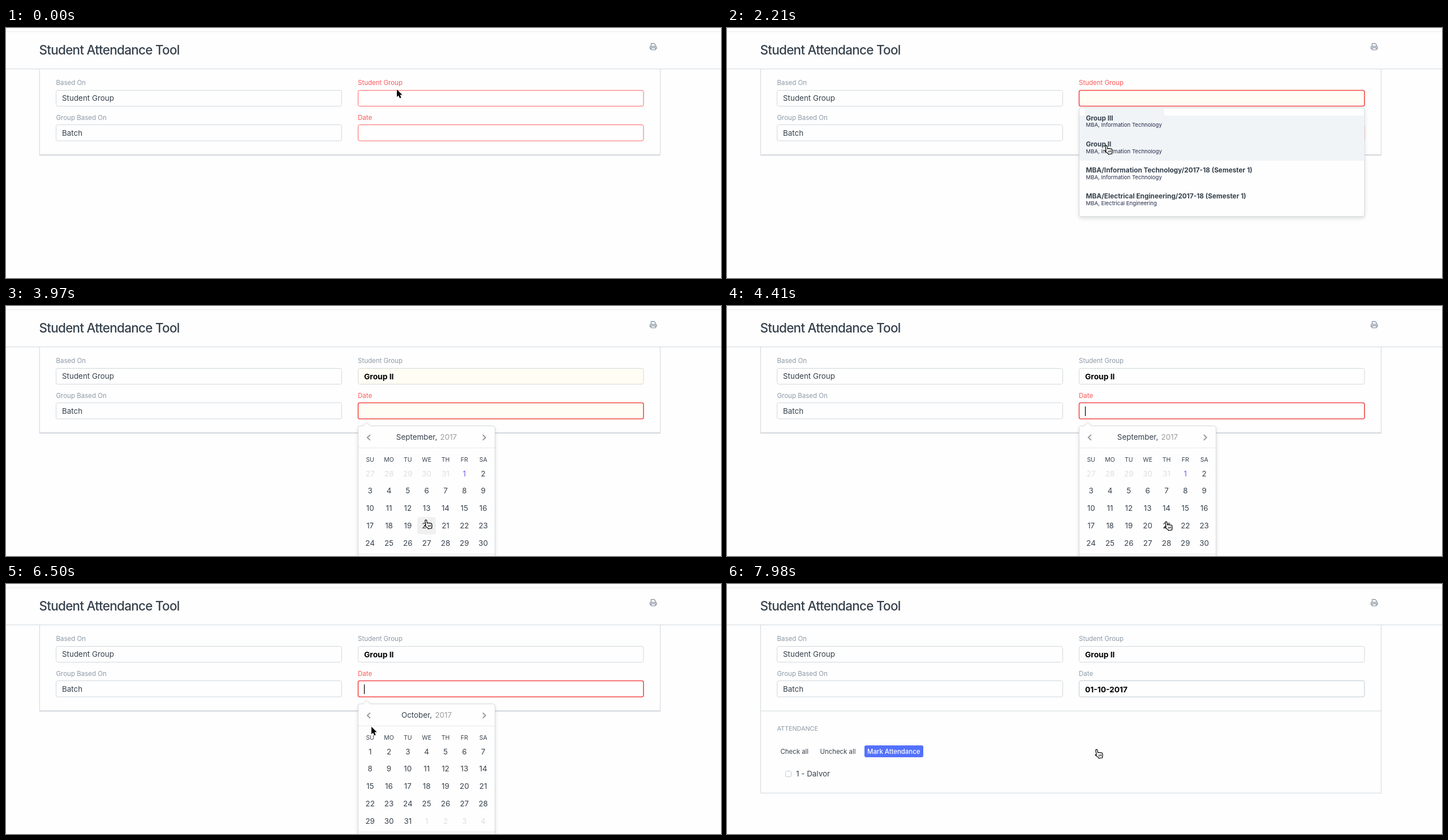
Write an HTML page that moves like this. It is 1264 px wide and 443 px high and loops after 8000 ms.

```html
<!DOCTYPE html>
<html lang="en">
<head>
<meta charset="utf-8">
<title>Student Attendance Tool</title>
<style>
  html, body { margin: 0; width: 100%; height: 100%; overflow: hidden; background: #fefefe; }
  svg { display: block; width: 100%; height: 100%; }
  text { font: 13.4px Inter, "Open Sans", sans-serif; font-optical-sizing: none; fill: #36414c; white-space: pre; }
  .title { font-size: 22.5px; font-weight: 500; letter-spacing: -.75px; }
  .label { font-size: 11.5px; fill: #8d99a6; }
  .bold { font-size: 13.8px; font-weight: 700; fill: #000; }
  .item { font-size: 11.8px; font-weight: 700; }
  .sub { font-size: 9.6px; fill: #222a4a; }
  .mid { text-anchor: middle; }
  .week { font-size: 10.5px; }
  .small { font-size: 11.4px; }
  .box { fill: #fefefe; stroke: #d1d8dd; }
  .line { fill: none; stroke: #d1d8dd; }
  .pop { fill: #fefefe; stroke: #d3d9dd; filter: drop-shadow(0 3px 3px rgba(0,0,0,.13)); }
  .chevron { fill: none; stroke: #9c9c9c; stroke-width: 2; }
  .caret { stroke: #000; stroke-width: 1.2; }
</style>
</head>
<body>
<svg viewBox="0 0 1264 443">
  <path d="M0 6.5H1264" stroke="#e8ebed"/>
  <path class="line" d="M59.5 72V225M1156.5 72V225"/>
  <path id="edge" d="M59 225H1157" stroke="#d1d8dd"/>
  <path class="line" d="M0 72.5H1264"/>
  <text class="title" x="58.5" y="47">Student Attendance Tool</text>
  <g fill="none" stroke="#8d99a6" stroke-width="1.3">
    <path d="M1140.5 33V27.5H1146L1148 29.5V33M1140.5 36.5H1138.5V33.5Q1138.5 32.5 1139.5 32.5H1149Q1150 32.5 1150 33.5V36.5H1148M1140.5 35H1148V38.7H1140.5Z"/>
  </g>

  <text class="label" x="88.5" y="101">Based On</text>
  <text class="label" x="88.5" y="163">Group Based On</text>
  <text class="label" id="groupLabel" x="622" y="101">Student Group</text>
  <text class="label" id="dateLabel" x="622" y="163">Date</text>
  <rect class="box" x="88.5" y="110.5" width="505" height="28" rx="3"/>
  <rect class="box" x="88.5" y="171.5" width="505" height="28.5" rx="3"/>
  <rect class="box" id="groupBox" x="622.5" y="110.5" width="504.5" height="28" rx="3"/>
  <rect class="box" id="dateBox" x="622.5" y="171.5" width="504.5" height="28.5" rx="3"/>
  <text x="99" y="129">Student Group</text>
  <text x="99" y="190.7">Batch</text>
  <text class="bold" id="groupText" x="633" y="130">Group II</text>
  <text class="bold" id="dateText" x="633" y="191.5">01-10-2017</text>
  <path class="caret" id="groupCaret" d="M0 117V133"/>
  <path class="caret" id="dateCaret" d="M633.5 178V195"/>

  <g id="list">
    <rect class="pop" x="622.5" y="141.5" width="504.5" height="192.5" rx="4"/>
    <path d="M623 155H633V143H773V155H1126.5V189H623Z" fill="#f0f4f7"/>
    <rect id="itemHover" x="623" y="189" width="503.5" height="46" fill="#f0f4f7"/>
  </g>

  <g id="calendar">
    <path class="pop" d="M622.5 460V216.5Q622.5 212.5 626.5 212.5H631.5L637.5 206L643.5 212.5H860.5Q864.5 212.5 864.5 216.5V460Z"/>
    <path d="M623 251.5H864M623 439.5H864" stroke="#e6e8ea"/>
    <path class="chevron" d="M643.8 228.2L638.8 233L643.8 237.8M842.8 228.2L847.8 233L842.8 237.8"/>
    <rect id="dayHover" width="33" height="30.5" rx="4" fill="#f0f0f0"/>
  </g>

  <g id="attendance">
    <path class="line" d="M59.5 225V370.5H1156.5V225"/>
    <text class="label" style="font-size:10.8px" x="88.5" y="260">ATTENDANCE</text>
    <text class="small" x="94.5" y="300.5">Check all</text>
    <text class="small" x="164.5" y="300.5">Uncheck all</text>
    <rect x="243" y="286" width="104" height="21" rx="3" fill="#5371fc"/>
    <text class="small" style="fill:#fff;font-weight:500" x="248" y="300.5">Mark Attendance</text>
    <rect class="box" x="103.5" y="331.5" width="10" height="10" rx="2" style="stroke:#c3c9ce"/>
    <text x="122" y="341">1 - Dalvor</text>
  </g>

  <g id="cursor">
    <path id="arrow" d="M0 0V13.2L3 10.4L5.2 15.4L7.6 14.3L5.4 9.5H9.6Z" fill="#000" stroke="#fff" stroke-width="1" paint-order="stroke"/>
    <path id="beam" d="M-2.5 -8Q0 -8 0 -6V6Q0 8 -2.5 8M2.5 -8Q0 -8 0 -6V6Q0 8 2.5 8" fill="none" stroke="#333"/>
    <g id="hand" transform="rotate(-10)" stroke="#000" stroke-width="1.2">
      <path d="M-1.5 9.6V1.7a1.5 1.5 0 0 1 3 0V6.2q2.3-.6 2.6.6q2-.6 2.5.7q2.4-.4 2.6 1.6v2.5q0 2-1.2 3.4v1.4H1.5V15.4Q-.7 12.6-3.5 10q-.4-2 2-.4z" fill="#fff"/>
      <path d="M2.5 10v3.3M4.6 10v3.3M6.7 10v3.3" stroke-width=".9"/>
    </g>
  </g>
</svg>
<script>
const $ = id => document.getElementById(id);
const show = (id, on) => $(id).style.display = on ? '' : 'none';
const STEP = 147.6, CELL_W = 33.33, CELL_H = 30.85;
const GRID_X = 627, GRID_Y = 281.5;

function add(parent, text, x, y, cls, fill) {
  const el = document.createElementNS('http://www.w3.org/2000/svg', 'text');
  el.setAttribute('x', x);
  el.setAttribute('y', y);
  el.setAttribute('class', cls);
  if (fill) el.style.fill = fill;
  el.innerHTML = text;
  parent.append(el);
}

const IT = 'Information Technology', EE = 'Electrical Engineering';
[['Group III', IT], ['Group II', IT],
 [`MBA/${IT}/2017-18 (Semester 1)`, IT],
 [`MBA/${EE}/2017-18 (Semester 1)`, EE]].forEach(([name, course], i) => {
  const y = 163.5 + i * 46.2;
  add($('list'), name, 634.5, y, 'item');
  add($('list'), 'MBA, ' + course, 634.5, y + 11.8, 'sub');
});

const colX = c => GRID_X + (c + .5) * CELL_W;
['SU', 'MO', 'TU', 'WE', 'TH', 'FR', 'SA'].forEach((d, c) =>
  add($('calendar'), d, colX(c), 275.5, 'mid week'));

function month(id, name, lead, length, before, today) {
  const g = document.createElementNS('http://www.w3.org/2000/svg', 'g');
  g.id = id;
  $('calendar').append(g);
  add(g, `${name}, <tspan dx="1.5" fill="#9c9c9c">2017</tspan>`, 743.5, 237, 'mid');
  for (let i = 0; i < 35; i++) {
    const n = i - lead + 1, outside = n < 1 || n > length;
    const day = n < 1 ? n + before : n > length ? n - length : n;
    const fill = outside ? '#dedede' : n === today ? '#7058f5' : '';
    add(g, day, colX(i % 7), 301.5 + Math.floor(i / 7) * CELL_H, 'mid', fill);
  }
}
month('september', 'September', 5, 30, 31, 1);
month('october', 'October', 0, 31, 30);

// Pointer path: step, x, y, shape
const path = [
  [0, 691, 109, 'arrow'], [1, 691, 122, 'beam'], [9, 691, 124, 'beam'],
  [10, 688, 146, 'hand'], [13, 674, 198, 'hand'], [15, 670, 208, 'hand'],
  [17, 668, 206, 'arrow'], [19, 668, 204, 'arrow'], [20, 671, 190, 'beam'],
  [21, 674, 187, 'beam'], [23, 676, 192, 'beam'], [24, 690, 255, 'arrow'],
  [25, 724, 340, 'hand'], [26, 742, 379, 'hand'], [28, 742, 379, 'hand'],
  [30, 776, 382, 'hand'], [32, 830, 372, 'hand'], [34, 864, 300, 'arrow'],
  [36, 845, 250, 'arrow'], [39, 845, 250, 'arrow'], [40, 844, 232, 'hand'],
  [42, 844, 232, 'hand'], [43, 735, 246, 'arrow'], [44, 646, 253, 'arrow'],
  [46, 640, 284, 'hand'], [49, 644, 292, 'hand'], [52, 653, 293, 'hand'], [55, 653, 293, 'hand']
];
function pointer(k) {
  const i = Math.max(0, path.findLastIndex(p => p[0] <= k));
  const a = path[i], b = path[i + 1] || a;
  const u = b === a ? 0 : (k - a[0]) / (b[0] - a[0]);
  return { x: a[1] + (b[1] - a[1]) * u, y: a[2] + (b[2] - a[2]) * u, shape: a[3] };
}
function cellAt(p) {
  const c = Math.floor((p.x - GRID_X) / CELL_W), r = Math.floor((p.y - GRID_Y) / CELL_H);
  return c >= 0 && c < 7 && r >= 0 && r < 5 ? r * 7 + c : -1;
}
const blink = (time, start) => time >= start && (time - start) % 1000 < 500;

function field(name, missing, focused, cream) {
  $(name + 'Label').style.fill = missing ? '#ff5858' : '';
  const s = $(name + 'Box').style;
  s.stroke = missing ? (focused ? '#f34848' : '#ff6464') : focused ? '#bcc8d0' : '';
  s.strokeWidth = missing && focused ? 1.6 : 1;
  s.fill = cream ? '#fffdf4' : '';
}

function draw() {
  const t = performance.now() % 8000;
  const k = Math.floor((t + 20) / STEP), time = k * STEP;
  const p = pointer(k);

  field('group', k < 17, k >= 2 && k < 20, k >= 2 && k < 30);
  field('date', k < 50, k >= 21, k >= 3 && k < 30);
  show('groupText', k >= 17);
  show('dateText', k >= 50);
  show('groupCaret', k < 20 && blink(time, 440));
  $('groupCaret').setAttribute('transform', `translate(${k < 17 ? 633.5 : 687.5})`);
  show('dateCaret', k < 50 && blink(time, 3390));

  show('list', k >= 6 && k < 16);
  show('itemHover', p.y > 189);

  show('calendar', k >= 23 && k < 50);
  show('september', k < 42);
  show('october', k >= 42);
  const cell = cellAt(p);
  show('dayHover', cell >= 0 && cell === cellAt(pointer(k - 1)));
  $('dayHover').setAttribute('transform',
    `translate(${GRID_X + cell % 7 * CELL_W} ${GRID_Y + Math.floor(cell / 7) * CELL_H})`);

  show('attendance', k >= 51);
  $('edge').style.strokeWidth = k >= 51 ? 1 : 2;

  $('cursor').setAttribute('transform', `translate(${p.x} ${p.y})`);
  for (const s of ['arrow', 'beam', 'hand']) show(s, s === p.shape);
  requestAnimationFrame(draw);
}
draw();
</script>
</body>
</html>
```
